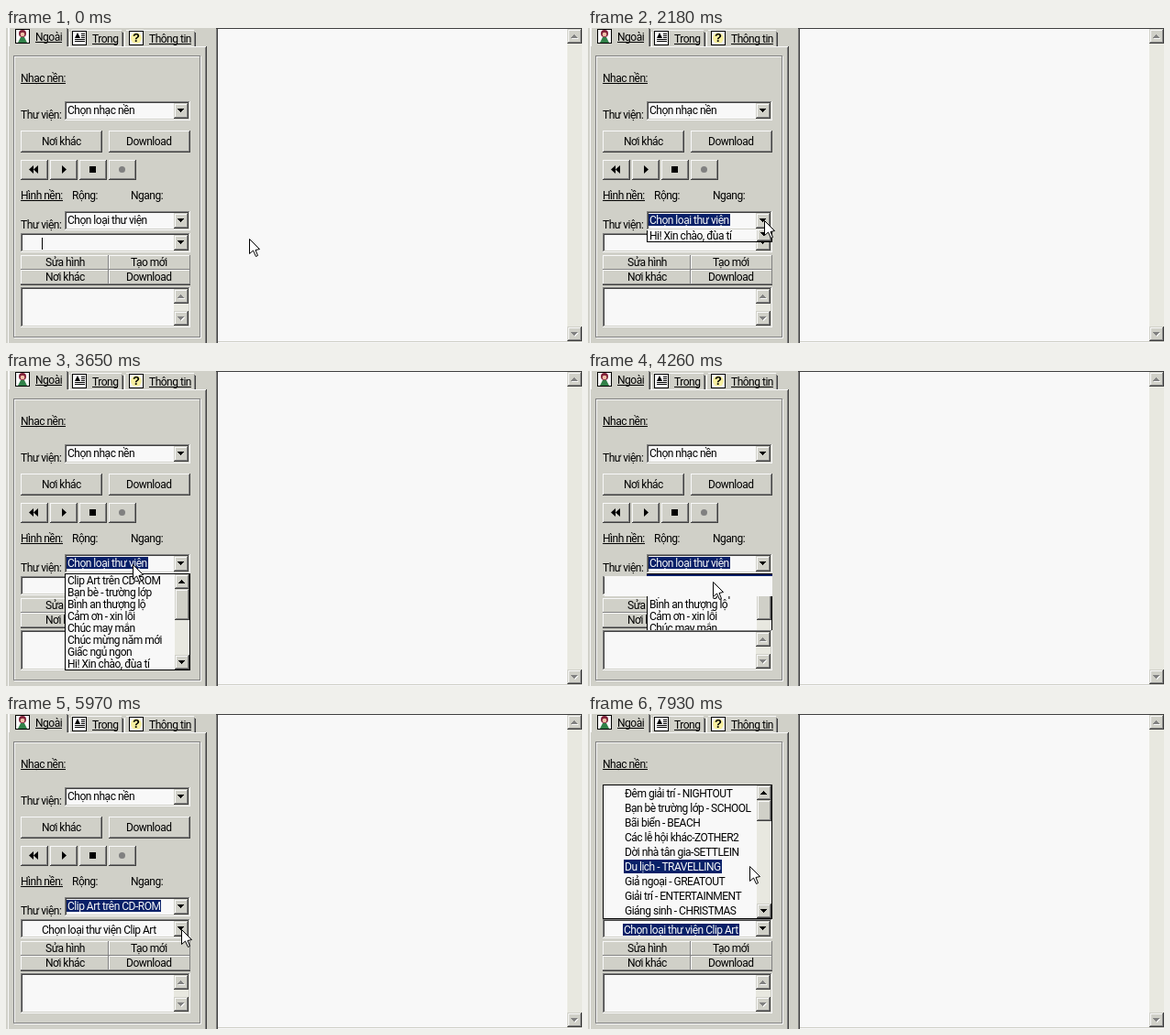
Write an HTML page with a canvas that moves like this. It is 628 by 344 pixels and loops after 8 s.

```html
<!DOCTYPE html>
<html lang="vi">
<head>
<meta charset="utf-8">
<style>
html, body { margin: 0; width: 100%; height: 100%; overflow: hidden; background: #d0d0c8; }
canvas { display: block; }
</style>
</head>
<body>
<canvas id="stage" width="628" height="344"></canvas>
<script>
const ctx = document.getElementById('stage').getContext('2d');
const FACE = '#d0d0c8', WHITE = '#f8f8f8', GRAY = '#808080', DARK = '#404040', BLACK = '#000', NAVY = '#082068', TRACK = '#e8e8e0';
const LOOP = 8000, TICK = 122; // the screen refreshes once per tick
ctx.font = '12px Roboto, "Liberation Sans", sans-serif';
ctx.letterSpacing = '-0.5px';

const smooth = p => { p = Math.min(1, Math.max(0, p)); return p * p * (3 - 2 * p); };
const rect = (x, y, w, h, color) => { ctx.fillStyle = color; ctx.fillRect(x, y, w, h); };

function edge(x, y, w, h, topLeft, bottomRight) {
  rect(x, y, w, 1, topLeft);
  rect(x, y, 1, h, topLeft);
  rect(x, y + h - 1, w, 1, bottomRight);
  rect(x + w - 1, y, 1, h, bottomRight);
}

function raised(x, y, w, h, outer = WHITE, inner = FACE) {
  rect(x, y, w, h, FACE);
  edge(x, y, w, h, outer, DARK);
  edge(x + 1, y + 1, w - 2, h - 2, inner, GRAY);
}

function sunken(x, y, w, h) {
  rect(x, y, w, h, WHITE);
  edge(x, y, w, h, GRAY, WHITE);
  edge(x + 1, y + 1, w - 2, h - 2, DARK, FACE);
}

// cy is the middle of the capitals
function text(s, x, cy, { color = BLACK, center = false, underline = false } = {}) {
  const w = ctx.measureText(s).width;
  if (center) x = Math.round(x - w / 2);
  ctx.fillStyle = color;
  ctx.fillText(s, x, cy + 4);
  if (underline) rect(x, cy + 5, Math.round(w), 1, color);
}

function selected(s, x, cy, h = 13) {
  rect(x - 1, cy - (h >> 1) - 1, Math.round(ctx.measureText(s).width) + 2, h, NAVY);
  text(s, x, cy, { color: WHITE });
}

function arrow(x, y, dir, color) {
  for (let i = 0; i < 4; i++) rect(x + i, y + (dir > 0 ? i : 3 - i), 7 - 2 * i, 1, color);
}

function arrowButton(x, y, h, dir, enabled = true) {
  raised(x, y, 16, h, FACE, WHITE);
  const top = y + (h >> 1) - 2;
  if (!enabled) arrow(x + 5, top + 1, dir, WHITE);
  arrow(x + 4, top, dir, enabled ? BLACK : GRAY);
}

function scrollbar(x, y, h, thumb = 0) {
  rect(x, y, 16, h, TRACK);
  arrowButton(x, y, 16, -1, thumb > 0);
  if (thumb) raised(x, y + 16, 16, thumb, FACE, WHITE);
  arrowButton(x, y + h - 16, 16, 1, thumb > 0);
}

function combo(x, y, w) {
  sunken(x, y, w, 21);
  arrowButton(x + w - 18, y + 2, 17, 1);
}

function polygon(points, color) {
  ctx.fillStyle = color;
  ctx.beginPath();
  points.forEach(([x, y]) => ctx.lineTo(x, y));
  ctx.closePath();
  ctx.fill();
}

function disc(x, y, r, color) {
  ctx.fillStyle = color;
  ctx.beginPath();
  ctx.arc(x, y, r, 0, 7);
  ctx.fill();
}

function tab(x, y, w, iconX, label, labelX, cy) {
  rect(x, y + 2, 1, 18 - y, WHITE);
  rect(x + 2, y, w - 4, 1, WHITE);
  rect(x + w - 2, y + 2, 1, 18 - y, GRAY);
  rect(x + w - 1, y + 3, 1, 17 - y, DARK);
  rect(iconX, cy - 9, 16, 16, WHITE);
  edge(iconX, cy - 9, 16, 16, BLACK, BLACK);
  text(label, labelX, cy, { underline: true });
}

function tabs() {
  rect(68, 20, 150, 1, WHITE);
  tab(3, -2, 65, 10, 'Ngoài', 32, 10);
  disc(18, 6, 4, '#802038');
  disc(18, 7, 2.3, '#f0c0a8');
  polygon([[13, 16], [16, 10], [20, 10], [23, 16]], '#308048');
  tab(69, 2, 59, 72, 'Trong', 94, 12);
  polygon([[75, 11], [78, 5], [81, 11]], BLACK);
  for (let i = 0; i < 5; i++) rect(i < 3 ? 82 : 75, 6 + 2 * i, i < 3 ? 4 : 11, 1, BLACK);
  tab(129, 2, 78, 134, 'Thông tin', 156, 12);
  disc(142, 11, 6, '#f8f0a0');
  ctx.save();
  ctx.font = 'bold 13px "Liberation Sans", sans-serif';
  text('?', 138, 11);
  ctx.restore();
}

function editor() {
  rect(229, 0, 399, 344, WHITE);
  rect(229, 0, 1, 344, GRAY);
  rect(230, 0, 1, 344, DARK);
  rect(229, 0, 399, 1, DARK);
  rect(231, 342, 397, 1, FACE);
  scrollbar(612, 1, 341);
}

function panel() {
  rect(0, 0, 628, 344, FACE);
  rect(2, 0, 1, 344, WHITE);
  rect(217, 21, 1, 323, GRAY);
  rect(218, 20, 1, 324, DARK);
  edge(9, 31, 204, 308, WHITE, WHITE);
  edge(8, 30, 204, 308, GRAY, GRAY);
  tabs();
  editor();

  text('Nhạc nền:', 16, 55, { underline: true });
  text('Thư viện:', 16, 95);
  combo(64, 80, 137);
  text('Chọn nhạc nền', 67, 90);
  ['Nơi khác', 'Download'].forEach((s, i) => {
    raised(16 + 96 * i, 112, 89, 24);
    text(s, 60 + 96 * i, 124, { center: true });
  });

  for (let i = 0; i < 4; i++) raised(16 + 32 * i, 144, 30, 22);
  for (const x of [25, 30]) polygon([[x, 154.5], [x + 5, 150], [x + 5, 159]], BLACK);
  polygon([[61, 150], [66, 154.5], [61, 159]], BLACK);
  rect(91, 151, 7, 7, BLACK);
  disc(126.5, 154.5, 3.5, GRAY);

  text('Hình nền:', 16, 183, { underline: true });
  text('Rộng:', 72, 183);
  text('Ngang:', 136, 183);
  text('Thư viện:', 16, 215);
  combo(64, 200, 137);
  combo(16, 224, 185);
  ['Sửa hình', 'Tạo mới', 'Nơi khác', 'Download'].forEach((s, i) => {
    const col = i % 2, row = i >> 1;
    edge(16 + 96 * col, 248 + 16 * row, col ? 89 : 96, 16, WHITE, GRAY);
    text(s, 64 + 92 * col, 256 + 16 * row, { center: true });
  });
  rect(16, 280, 185, 1, DARK);
  sunken(16, 283, 185, 44);
  scrollbar(183, 285, 40);
}

const CATEGORIES = ['Clip Art trên CD-ROM', 'Bạn bè - trường lớp', 'Bình an thượng lộ', 'Cảm ơn - xin lỗi',
  'Chúc may mắn', 'Chúc mừng năm mới', 'Giấc ngủ ngon', 'Hi! Xin chào, đùa tí'];
const THEMES = ['Đêm giải trí - NIGHTOUT', 'Bạn bè trường lớp - SCHOOL', 'Bãi biển - BEACH', 'Các lễ hội khác-ZOTHER2',
  'Dời nhà tân gia-SETTLEIN', 'Du lịch - TRAVELLING', 'Giả ngoại - GREATOUT', 'Giải trí - ENTERTAINMENT', 'Giáng sinh - CHRISTMAS'];
const PROMPT = 'Chọn loại thư viện';

// ticks at which the interface reacts
const FOCUS = 17, OPEN = 18, HOVER = 33, CLOSING = 35, CHOSEN = 36, THEMES_OPEN = 50, THEME_HOVER = 63;

function categoryList(tick) {
  const closing = tick >= CLOSING;
  const shown = Math.round(106 * smooth((tick - OPEN + 0.4) / 1.8));
  ctx.save();
  ctx.beginPath();
  ctx.rect(64, 221, 137, closing ? 62 : shown);
  ctx.clip();
  ctx.translate(0, shown - 106);
  rect(64, 221, 137, 106, WHITE);
  edge(64, 221, 137, 106, BLACK, BLACK);
  scrollbar(184, 222, 104, 34);
  CATEGORIES.forEach((s, i) => {
    const hot = i === 0 && tick >= HOVER;
    if (hot) rect(65, 222, 119, 13, NAVY);
    text(s, 67, 229 + 13 * i, { color: hot ? WHITE : BLACK });
  });
  ctx.restore();
  if (closing) {
    rect(64, 222, 137, 2, NAVY);
    rect(18, 224, 183, 22, WHITE);
  }
}

function themeList(tick) {
  rect(16, 77, 185, 147, WHITE);
  edge(16, 77, 185, 147, BLACK, BLACK);
  scrollbar(184, 78, 145, 23);
  THEMES.forEach((s, i) => {
    if (i === 5 && tick >= THEME_HOVER) selected(s, 40, 87 + 16 * i, 15);
    else text(s, 40, 87 + 16 * i);
  });
}

// pointer moves: first and last tick, then the goal
const MOVES = [
  [0, 1, 262, 222], [4, 8, 259, 204], [8, 17, 192, 210], [23, 27, 138, 207],
  [29, 33, 136, 230], [42, 48, 191, 235], [56, 61, 186, 169], [61, 65, 176, 166]
];

function pointer(tick) {
  let x = 265, y = 230;
  for (const [from, to, goalX, goalY] of MOVES) {
    const p = smooth((tick - from) / (to - from));
    x += (goalX - x) * p;
    y += (goalY - y) * p;
  }
  ctx.save();
  ctx.translate(Math.round(x) + 0.5, Math.round(y) + 0.5);
  polygon([[0, 0], [0, 16], [4, 12.5], [7, 19], [9, 18], [6.5, 12], [11, 11]], '#fff');
  ctx.strokeStyle = BLACK;
  ctx.lineWidth = 1;
  ctx.stroke();
  ctx.restore();
}

function draw(tick) {
  panel();
  const caretOn = Math.floor((tick + 1.4) / 4.34) % 2 === 0;
  if (tick < FOCUS) {
    text(PROMPT, 67, 210);
    if (caretOn) rect(39, 229, 1, 13, BLACK);
  } else selected(tick < CHOSEN ? PROMPT : CATEGORIES[0], 67, 210);
  if (tick >= CHOSEN) (tick < THEMES_OPEN ? text : selected)(PROMPT + ' Clip Art', 39, 236);
  if (tick >= OPEN && tick < CHOSEN) categoryList(tick);
  if (tick >= THEMES_OPEN) themeList(tick);
  pointer(tick);
}

const start = performance.now();
function animate() {
  const t = (performance.now() - start) % LOOP;
  draw(Math.floor((t + 20) / TICK));
  requestAnimationFrame(animate);
}
animate();
</script>
</body>
</html>
```
